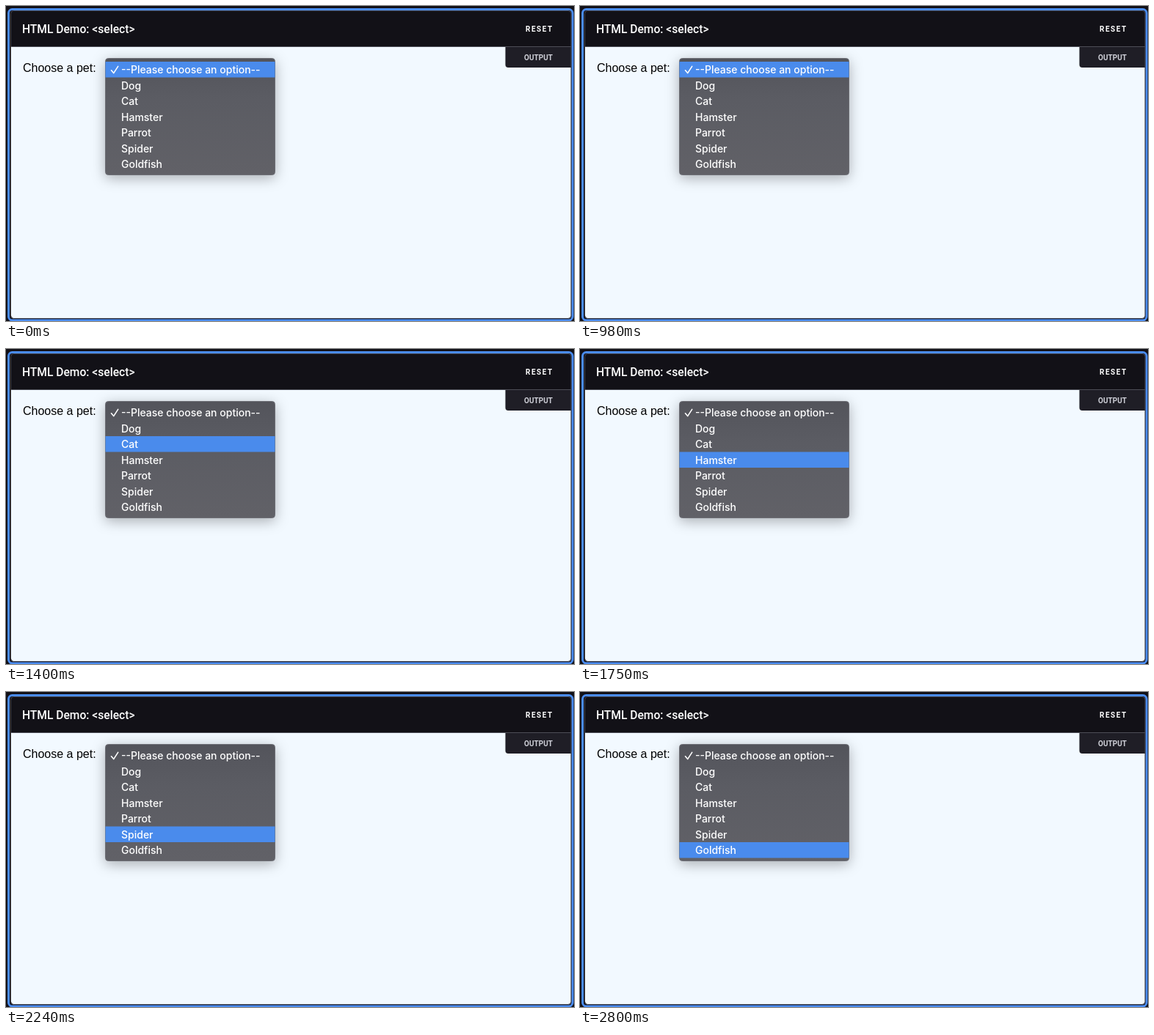
Recreate the animation shown at these times as an HTML page. Size 774 by 430 pixels, loop 3220 ms.

```html
<!DOCTYPE html>
<html lang="en">
<head>
<meta charset="utf-8">
<title>HTML select demo</title>
<style>
  html, body { margin: 0; width: 100%; height: 100%; overflow: hidden; background: #121117; }
  svg { display: block; }
  .title { font: 500 15.6px Roboto, sans-serif; fill: #fff; }
  .button { font: 700 10px Roboto, sans-serif; fill: #fff; letter-spacing: 1.5px; }
  .tab { font: 700 10px Roboto, sans-serif; fill: #cdced6; }
  .label { font: 16px "Liberation Sans", Arial, sans-serif; fill: #000; }
  .option { font: 500 14px Inter, sans-serif; fill: #fff; }
  .menu { filter: drop-shadow(0 4px 9px rgba(0, 0, 0, .3)); }
</style>
</head>
<body>
<svg width="774" height="430" viewBox="0 0 774 430">
  <defs>
    <linearGradient id="glass" x2="0" y2="1">
      <stop stop-color="#53545b"/>
      <stop offset=".35" stop-color="#5b5c63"/>
      <stop offset="1" stop-color="#616167"/>
    </linearGradient>
    <clipPath id="panel"><rect x="7" y="7" width="763" height="419.5" rx="4"/></clipPath>
  </defs>

  <rect x="3.5" y="4.5" width="768.5" height="424.5" rx="5" fill="#121117" stroke="#4a8cf0" stroke-width="3"/>
  <g clip-path="url(#panel)">
    <rect y="55" width="774" height="375" fill="#f2f9ff"/>
    <rect y="55" width="774" height="1" fill="#4d4e57"/>
    <path d="M680.5 56h89.5v28h-85.5a4 4 0 0 1-4-4z" fill="#1f1e26"/>
  </g>
  <rect x="6.5" y="6.5" width="763.5" height="420" rx="4" fill="none" stroke="#44454e"/>

  <text class="title" x="22" y="36.5">HTML Demo: &lt;select&gt;</text>
  <text class="button" x="708" y="34.5">RESET</text>
  <text class="tab" x="706" y="73.5">OUTPUT</text>
  <text class="label" x="23" y="90">Choose a pet:</text>

  <rect class="menu" x="135.5" y="71.5" width="231" height="159" rx="4" fill="url(#glass)" stroke="#6d6e75"/>
  <rect id="highlight" x="135.5" width="231" height="21.5" fill="#4a8bec"/>
  <path d="M143.5 87.8l3.2 3.8 6-9.2" fill="none" stroke="#fff" stroke-width="1.6"
        stroke-linecap="round" stroke-linejoin="round"/>
  <g id="options"></g>
</svg>
<script>
  const LOOP = 3220, ROW = 21.5, TOP = 76;
  const choices = [
    ["--Please choose an option--", 0],
    ["Dog", 1120],
    ["Cat", 1400],
    ["Hamster", 1750],
    ["Parrot", 1960],
    ["Spider", 2240],
    ["Goldfish", 2800]
  ];
  const highlight = document.getElementById("highlight");

  document.getElementById("options").innerHTML = choices.map(([name], i) =>
    `<text class="option" x="157" y="${TOP + 16 + i * ROW}">${name}</text>`).join("");

  function draw(now) {
    const time = now % LOOP;
    const row = choices.filter(([, start]) => start <= time).length - 1;
    highlight.setAttribute("y", TOP + row * ROW);
    requestAnimationFrame(draw);
  }
  draw(performance.now());
</script>
</body>
</html>
```
